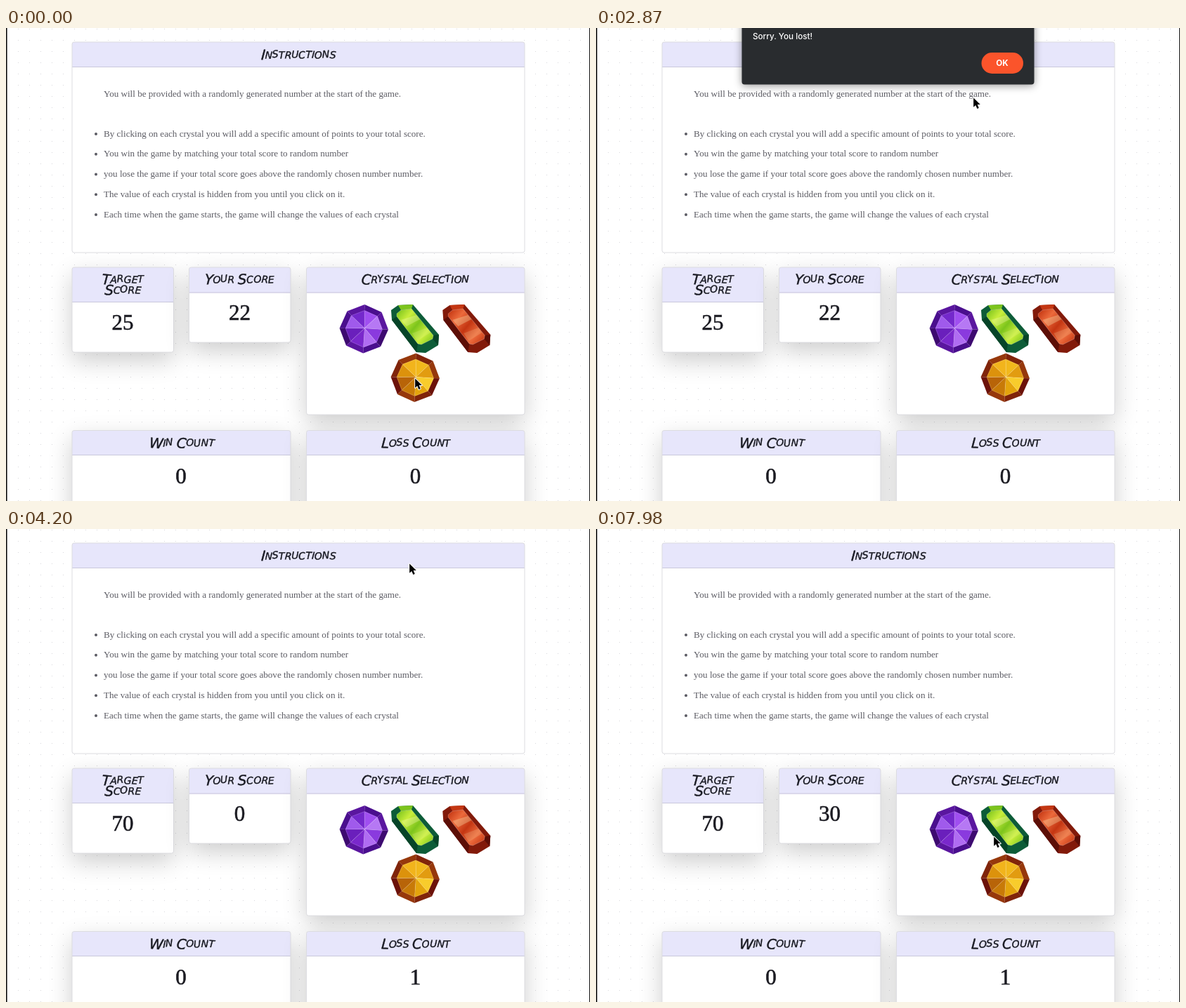
Animation, 831 px wide and 674 px high, one loop 8000 ms. Source, as an HTML page with a canvas:

```html
<!DOCTYPE html>
<html lang="en">
<head>
<meta charset="utf-8">
<title>Crystal game</title>
<style>
html, body { margin: 0; width: 100%; height: 100%; overflow: hidden; background: #fff; }
canvas { display: block; }
</style>
</head>
<body>
<canvas id="stage" width="831" height="674"></canvas>
<script>
const W = 831, H = 674, LOOP = 8000, STEP = 70;
const SERIF = '"Liberation Serif", serif';
const stage = document.getElementById('stage').getContext('2d');

const clamp = v => Math.max(0, Math.min(1, v));

// Paint once on a hidden canvas
function layer(w, h, paint) {
  const cv = document.createElement('canvas');
  cv.width = w;
  cv.height = h;
  paint(cv.getContext('2d'));
  return cv;
}

function poly(c, pts, fill) {
  c.beginPath();
  pts.forEach(([x, y]) => c.lineTo(x, y));
  c.closePath();
  c.fillStyle = fill;
  c.fill();
}

// Marker-style small caps, each letter a little tilted and off the baseline
function title(c, text, cx, base) {
  const glyphs = text.split('').map((ch, i) => {
    const big = i === 0 || text[i - 1] === ' ';
    c.font = `italic ${big ? 20 : 14}px "DejaVu Sans", sans-serif`;
    return { ch: ch.toUpperCase(), font: c.font, big, w: c.measureText(ch.toUpperCase()).width };
  });
  let x = cx - glyphs.reduce((sum, g) => sum + g.w, 0) / 2;
  c.fillStyle = c.strokeStyle = '#191a22';
  c.lineWidth = 0.4;
  c.textAlign = 'left';
  glyphs.forEach((g, i) => {
    c.save();
    c.translate(x, base + (g.big ? 2 : Math.sin(i * 2.3) * 0.7));
    c.rotate(Math.sin(i * 1.7 + 1) * 0.08);
    c.font = g.font;
    c.fillText(g.ch, 0, 0);
    c.strokeText(g.ch, 0, 0);
    c.restore();
    x += g.w;
  });
}

function card(c, x, y, w, h, head, shadow) {
  const box = (hh, radii) => {
    c.beginPath();
    c.roundRect(x, y, w, hh, radii);
  };
  c.save();
  if (shadow) {
    c.shadowColor = 'rgba(0,0,0,.2)';
    c.shadowBlur = 34;
    c.shadowOffsetY = 12;
  }
  box(h, 3);
  c.fillStyle = '#fff';
  c.fill();
  c.restore();
  box(head, [3, 3, 0, 0]);
  c.fillStyle = '#e7e6fb';
  c.fill();
  c.fillStyle = '#c9c8dc';
  c.fillRect(x, y + head - 1, w, 1);
  box(h, 3);
  c.strokeStyle = '#dcdce0';
  c.lineWidth = 1;
  c.stroke();
}

function roundGem(c, cx, cy, rim, faces) {
  const pt = (i, r) => {
    const a = i * Math.PI / 4 - 1.54;
    return [cx + r * Math.cos(a), cy + r * Math.sin(a)];
  };
  for (let i = 0; i < 8; i++) {
    poly(c, [pt(i, 34.7), pt(i + 1, 34.7), pt(i + 1, 25), pt(i, 25)], rim[i % rim.length]);
    poly(c, [pt(i, 26.5), pt(i + 1, 26.5), [cx + 1, cy - 1]], faces[i]);
  }
  c.strokeStyle = 'rgba(255,255,255,.22)';
  c.lineWidth = 0.8;
  c.beginPath();
  for (let i = 0; i < 8; i++) {
    c.moveTo(cx + 1, cy - 1);
    c.lineTo(...pt(i, 26));
    c.lineTo(...pt(i + 1, 26));
  }
  c.stroke();
}

function longGem(c, x, y, rim, dark, mid, light) {
  c.save();
  c.translate(x, y);
  const outer = [[0, 8], [10, 1], [31, 0], [68, 43], [67, 58], [49, 69], [36, 68], [1, 22]];
  const inner = [[8, 13], [14, 8], [29, 6], [60, 44], [59, 49], [43, 57], [38, 56], [8, 17]];
  poly(c, outer, rim);
  poly(c, [outer[6], outer[7], inner[7], inner[6]], dark);
  poly(c, [outer[3], outer[4], inner[4], inner[3]], dark);
  poly(c, [outer[1], outer[2], inner[2], inner[1]], mid);
  const g = c.createLinearGradient(8, 10, 60, 54);
  [mid, light, mid, light, mid].forEach((col, i) => g.addColorStop(i / 4, col));
  poly(c, inner, g);
  poly(c, [[14, 22], [36, 15], [41, 21], [22, 31]], 'rgba(255,255,200,.28)');
  poly(c, [[30, 41], [51, 33], [56, 40], [37, 52]], 'rgba(255,255,200,.16)');
  c.strokeStyle = 'rgba(255,255,255,.3)';
  c.lineWidth = 0.8;
  c.beginPath();
  inner.forEach(p => c.lineTo(...p));
  c.closePath();
  c.stroke();
  c.restore();
}

function paintPage(c) {
  c.fillStyle = '#fff';
  c.fillRect(0, 0, W, H);
  c.fillStyle = '#d8d8dc';
  for (let y = 1; y < H; y += 16)
    for (let x = 17; x < W; x += 16) c.fillRect(x, y, 1, 1);

  card(c, 94, 20, 644, 300, 36);
  card(c, 94, 341, 144.5, 121, 50, true);
  card(c, 260.5, 341, 144.5, 107, 36.5, true);
  card(c, 427.5, 341, 310.5, 210, 36.5, true);
  card(c, 94, 573.5, 311, 140, 35.5, true);
  card(c, 427.5, 573.5, 310.5, 140, 35.5, true);

  title(c, 'Instructions', 416, 43);
  title(c, 'Target', 166, 363);
  title(c, 'Score', 166, 378);
  title(c, 'Your Score', 332, 363);
  title(c, 'Crystal Selection', 582, 363);
  title(c, 'Win Count', 250, 596);
  title(c, 'Loss Count', 583, 596);

  c.font = '13.1px ' + SERIF;
  c.fillStyle = '#5c5c64';
  c.fillText('You will be provided with a randomly generated number at the start of the game.', 139, 98);
  [
    'By clicking on each crystal you will add a specific amount of points to your total score.',
    'You win the game by matching your total score to random number',
    'you lose the game if your total score goes above the randomly chosen number number.',
    'The value of each crystal is hidden from you until you click on it.',
    'Each time when the game starts, the game will change the values of each crystal'
  ].forEach((line, i) => {
    const y = 154.5 + i * 28.75;
    c.fillText(line, 139, y);
    c.beginPath();
    c.arc(128, y - 3.5, 2, 0, 7);
    c.fill();
  });

  roundGem(c, 509.3, 428.7, ['#4a0f8e', '#5a169f', '#3d0a70'],
    ['#a04ff0', '#b678f4', '#8a3ade', '#b06cf2', '#7a28cc', '#6a1fbc', '#a05aec', '#7428cc']);
  longGem(c, 548, 394, '#0d5c38', '#064428', '#7cc41c', '#c9ee3c');
  longGem(c, 621.3, 394, '#821a0a', '#5c0e06', '#c43612', '#ec6a3c');
  roundGem(c, 582.3, 498.2, ['#80240a', '#96380c', '#6c120a'],
    ['#f2b81c', '#e29c10', '#f8cc2c', '#e4a40c', '#c87a08', '#b86408', '#dc920c', '#f2b41c']);

  c.fillStyle = '#111';
  c.fillRect(0, 0, 1.6, H);
  c.fillRect(830, 0, 1, H);
}

function number(c, value, x, base) {
  c.font = '31px ' + SERIF;
  c.textAlign = 'center';
  c.fillStyle = c.strokeStyle = '#1b1b22';
  c.lineWidth = 0.6;
  c.fillText(value, x, base);
  c.strokeText(value, x, base);
}

function paintAlert(c, buttonColor) {
  c.save();
  c.shadowColor = 'rgba(0,0,0,.4)';
  c.shadowBlur = 12;
  c.shadowOffsetY = 2;
  c.beginPath();
  c.roundRect(207.5, -40, 416, 120.5, 4);
  c.fillStyle = '#292c2f';
  c.fill();
  c.restore();
  c.beginPath();
  c.roundRect(548.5, 35, 59.5, 30, 15);
  c.fillStyle = buttonColor;
  c.fill();
  c.fillStyle = '#fff';
  c.font = '500 11.7px Inter, sans-serif';
  c.fillText('Sorry. You lost!', 223, 16);
  c.textAlign = 'center';
  c.font = '700 11.7px Inter, sans-serif';
  c.fillText('OK', 578, 54);
}

// The box fades as a whole while it slides up; p is 1 when fully open
function showAlert(c, img, p) {
  const scale = 1 - 0.02 * (1 - p);
  c.save();
  c.globalAlpha = Math.pow(p, 0.69);
  c.translate(415.5, -15 * (1 - p));
  c.scale(scale, 1);
  c.drawImage(img, -415.5, 0);
  c.restore();
}

// time, x, y of the pointer tip
const PATH = [
  [0, 581, 498], [140, 581, 498], [560, 511, 444], [1750, 511, 444],
  [1820, 520, 457], [2030, 520, 457], [2450, 529, 133], [2660, 529, 133],
  [2870, 536, 98], [3360, 573, 48], [4410, 573, 48], [5040, 577, 428],
  [5110, 577, 428], [5250, 575, 449], [5460, 575, 449], [5600, 516, 436],
  [7770, 516, 436], [7980, 565, 437]
];

function pointerAt(t) {
  const i = PATH.findIndex(k => k[0] > t);
  if (i < 0) return PATH[PATH.length - 1].slice(1);
  const [t0, x0, y0] = PATH[i - 1], [t1, x1, y1] = PATH[i];
  const u = (t - t0) / (t1 - t0), e = u * u * (3 - 2 * u);
  return [x0 + (x1 - x0) * e, y0 + (y1 - y0) * e];
}

function pointer(c, [x, y]) {
  c.save();
  c.translate(x + 0.7, y + 1);
  c.scale(0.92, 0.92);
  c.beginPath();
  [[0.5, 0.5], [0.5, 15], [3.8, 12], [6.2, 17.4], [8.8, 16.2], [6.5, 11], [11, 11]]
    .forEach(p => c.lineTo(...p));
  c.closePath();
  c.lineJoin = 'round';
  c.lineWidth = 2.2;
  c.strokeStyle = '#fff';
  c.stroke();
  c.fillStyle = '#000';
  c.fill();
  c.restore();
}

const page = layer(W, H, paintPage);
const alertIdle = layer(W, 100, c => paintAlert(c, '#fb542b'));
const alertHover = layer(W, 100, c => paintAlert(c, '#ff8a60'));

const ALERT_OPEN = 1190, HOVER = 3500, CLOSING = 3990, RESET = 4200;
const CLICKS = [6300, 6930, 7490];

function draw(now) {
  const t = Math.floor((now % LOOP) / STEP) * STEP;
  const reset = t >= RESET;
  const clicks = CLICKS.filter(at => t >= at).length;

  stage.drawImage(page, 0, 0);
  number(stage, reset ? 70 : 25, 166, 430);
  number(stage, reset ? clicks * 10 : 22, 332.5, 416);
  number(stage, 0, 249, 649);
  number(stage, reset ? 1 : 0, 582.5, 649);
  if (t >= ALERT_OPEN && t < RESET) {
    const p = clamp(1 - (t - CLOSING) / (RESET - CLOSING));
    showAlert(stage, t < HOVER ? alertIdle : alertHover, p);
  }
  pointer(stage, pointerAt(t));
}

const start = performance.now();
function tick() {
  draw(performance.now() - start);
  requestAnimationFrame(tick);
}
tick();
</script>
</body>
</html>
```
